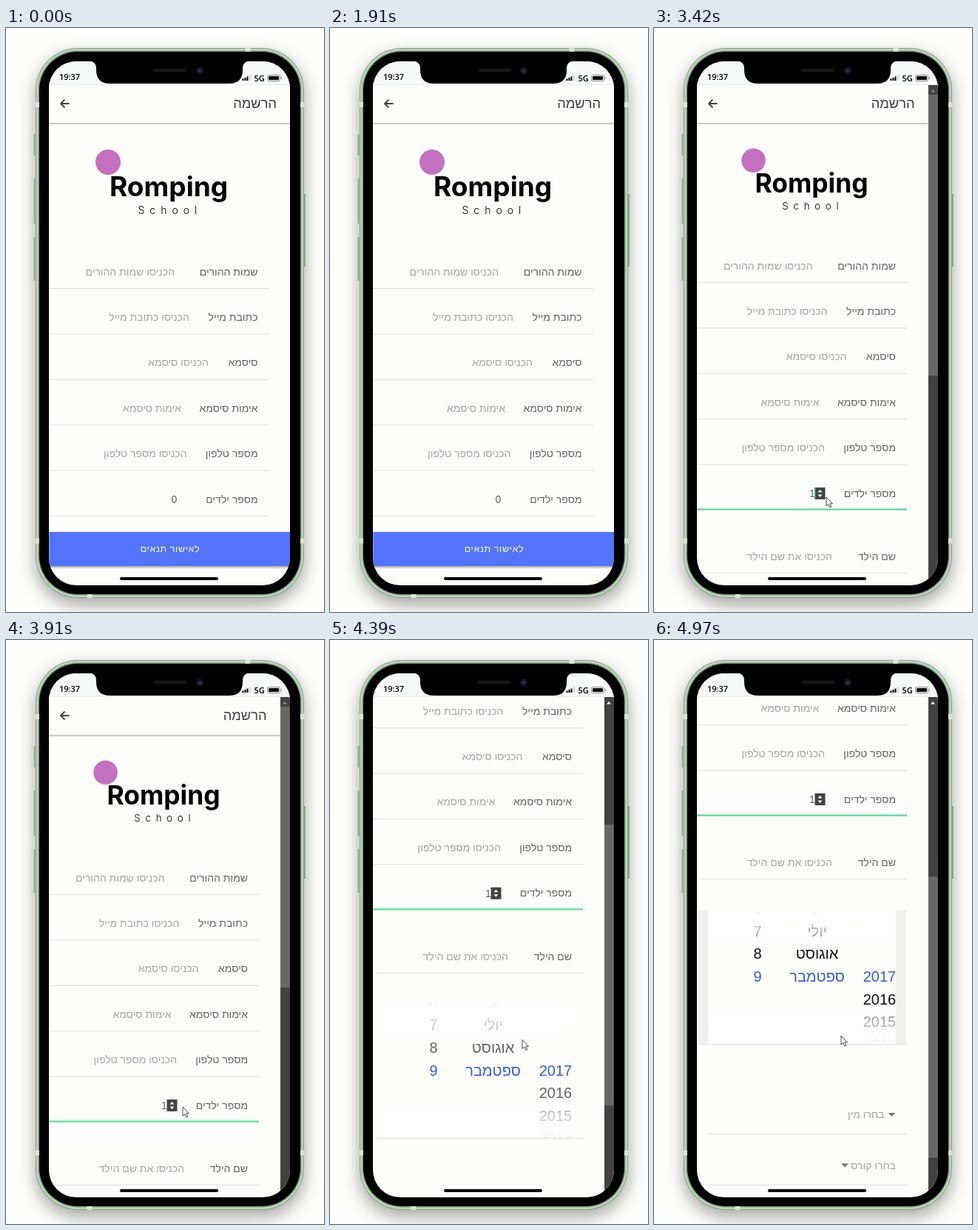
These frames come from a looping animation (430x788 px, 5000 ms). An HTML page:

```html
<!DOCTYPE html>
<html lang="he">
<head>
<meta charset="utf-8">
<title>Registration form</title>
<style>
  html, body { margin: 0; width: 100%; height: 100%; overflow: hidden; background: #fefefd; }
  svg { display: block; width: 430px; height: 788px; }
  text { font: 14px "Liberation Sans", Arial, sans-serif; }
  .rtl { direction: rtl; }
  .label { fill: #626262; }
  .hint { fill: #a3a3a3; }
  .title { font-size: 18.3px; fill: #3c3c3c; }
  .button { font-size: 12.5px; letter-spacing: .05em; fill: #fff; text-anchor: middle; }
  .status { font: 600 11px "Open Sans", sans-serif; }
  .brand { font: 700 37px Inter, sans-serif; }
  .tagline { font: 300 14px Inter, sans-serif; letter-spacing: 7px; }
  .wheel text { font-size: 20px; text-anchor: middle; }
  .picked { fill: #2f5fd8; }
</style>
</head>
<body>
<svg viewBox="0 0 430 788">
  <defs>
    <filter id="soft" x="-20%" y="-20%" width="140%" height="140%"><feGaussianBlur stdDeviation="12"/></filter>
    <filter id="thin" x="-5%" y="-20%" width="110%" height="150%"><feGaussianBlur stdDeviation="1.5"/></filter>
    <clipPath id="screen"><rect x="58" y="45" width="326" height="707" rx="37"/></clipPath>
    <clipPath id="viewport"><rect x="58" y="77" width="326" height="675"/></clipPath>
    <clipPath id="wheelBox"><rect x="58" y="777" width="284" height="181"/></clipPath>
    <linearGradient id="fadeTop" x2="0" y2="1">
      <stop stop-color="#fff"/><stop offset="1" stop-color="#fff" stop-opacity=".45"/>
    </linearGradient>
    <linearGradient id="fadeBottom" x2="0" y2="1">
      <stop stop-color="#fff" stop-opacity=".45"/><stop offset="1" stop-color="#fff"/>
    </linearGradient>
  </defs>

  <!-- phone body -->
  <rect x="40" y="36" width="363" height="742" rx="57" opacity=".36" filter="url(#soft)"/>
  <path d="M38.500 143V172M38.500 203V264M38.500 282V341M404 224V322" stroke="#8fa78e" stroke-width="2"/>
  <rect x="40" y="27" width="363" height="742" rx="57" fill="#86a386"/>
  <rect x="41" y="28" width="361" height="740" rx="56" fill="#bcd6b9"/>
  <rect x="43.500" y="30.500" width="356" height="735" rx="53.500" fill="#7d997d"/>
  <path d="M40 103.500H45M40 692H45M398 103.500H403M398 692H403M327 27V32M113 764V769" stroke="#d5e6d2" stroke-width="7"/>
  <rect x="45" y="32" width="353" height="732" rx="52"/>

  <g clip-path="url(#screen)">
    <rect x="58" y="45" width="326" height="707" fill="#fefefd"/>
    <g clip-path="url(#viewport)">
      <g id="page"></g>
      <g id="scrollbar">
        <rect x="371" y="77" width="13" height="675" fill="#424242"/>
        <rect id="thumb" x="371" y="90" width="12.500" height="379" fill="#686868"/>
        <path id="scrollUp" d="M374 86.500H380L377 83Z"/>
      </g>
      <g id="submit">
        <rect x="59" y="682" width="326" height="46" opacity=".35" filter="url(#thin)"/>
        <rect x="58.500" y="680" width="326" height="46" fill="#5474fb"/>
        <text class="rtl button" x="222" y="707">לאישור תנאים</text>
      </g>
    </g>
    <rect x="58" y="45" width="326" height="32" fill="#f7f8f8"/>
    <path d="M58 76.500H384" stroke="#e9eaea"/>
    <rect x="154" y="741" width="133" height="4" rx="2"/>
  </g>

  <!-- notch and status bar -->
  <path d="M111 44Q122 45 122 54V57Q122 75 141 75H301Q320 75 320 57V54Q320 45 331 44Z"/>
  <rect x="200" y="54.500" width="44" height="5" rx="2.500" fill="#161616"/>
  <circle cx="262" cy="57.500" r="5" fill="#141722"/>
  <circle cx="262" cy="57.500" r="2" fill="#2a3566"/>
  <text class="status" x="72" y="70">19:37</text>
  <path d="M320.500 71V68.500M323.500 71V67M326.500 71V65.500" stroke="#000" stroke-width="2"/>
  <path d="M330 71V63.500" stroke="#c4c4c4" stroke-width="1.500"/>
  <text class="status" x="335.500" y="71.500">5G</text>
  <rect x="353.500" y="63.500" width="17" height="8" rx="2" fill="none" stroke="#888"/>
  <rect x="355" y="65" width="14" height="5" rx="1"/>
  <path d="M372.300 66V69" stroke="#888"/>

  <path id="cursor" d="M0 0V12L2.800 9.500 4.800 14 6.800 13 4.900 8.800H8.500Z" fill="#fff" stroke="#333" stroke-width=".9"/>
</svg>

<script>
const LOOP = 5000;
const $ = id => document.getElementById(id);
const clamp = v => Math.min(1, Math.max(0, v));
const smooth = u => u * u * (3 - 2 * u);
const progress = (t, from, to) => clamp((t - from) / (to - from));

const rtl = (kind, x, y, s) => `<text class="rtl ${kind}" x="${x}" y="${y}">${s}</text>`;
const rule = (x1, x2, y) => `<path d="M${x1} ${y}H${x2}" stroke="#dedede"/>`;
const caretDown = (x, y) => `<path d="M${x} ${y}h10l-5 5z" fill="#777"/>`;

// label, hint, right edge of the hint
const fields = [
  ['שמות ההורים', 'הכניסו שמות ההורים', 228],
  ['כתובת מייל', 'הכניסו כתובת מייל', 248],
  ['סיסמא', 'הכניסו סיסמא', 274],
  ['אימות סיסמא', 'אימות סיסמא', 237],
  ['מספר טלפון', 'הכניסו מספר טלפון', 244.5],
  ['מספר ילדים', '', 0]
].map(([label, hint, right], i) => {
  const y = 333.5 + 61.4 * i;
  return rtl('label', 340.5, y, label) + rtl('hint', right, y, hint) + rule(58, 356, y + 18);
}).join('');

function wheelColumn(x, firstRow, values) {
  return values.map((value, i) => {
    const row = firstRow + i;
    const kind = row === 0 ? 'picked' : 'other';
    return `<text class="rtl ${kind}" x="${x}" y="${874 + 30.7 * row}">${value}</text>`;
  }).join('');
}

$('page').innerHTML = `
  <rect x="58" y="79" width="326" height="50" opacity=".4" filter="url(#thin)"/>
  <rect x="58" y="60" width="326" height="68" fill="#fefefd"/>
  <path d="M85.500 102H74.500M79.500 96.500L74 102L79.500 107.500" fill="none" stroke="#444" stroke-width="1.800"/>
  <g id="title">${rtl('title', 366, 108, 'הרשמה')}</g>
  <g id="logo">
    <circle cx="138" cy="181" r="17" fill="#c56fc1"/>
    <text class="brand" x="140" y="226.500">Romping</text>
    <text class="tagline" x="178.500" y="250.500">School</text>
  </g>
  <g id="form">
    ${fields}
    <text id="count" class="label" x="223.500" y="641"></text>
    <g id="stepper">
      <rect x="231" y="628" width="14" height="16" fill="#444"/>
      <path d="M235 634.500h6l-3-3.500zM235 637.500h6l-3 3.500z" fill="#fff"/>
    </g>
    <path id="caret" d="M231 628V644" stroke="#45d88d" stroke-width="1.500"/>
    <path id="focusLine" d="M58 657.500H355.500" stroke="#4ee39a" stroke-width="2"/>
  </g>
  <g id="child">
    ${rtl('label', 327, 718, 'שם הילד')}${rtl('hint', 241, 718, 'הכניסו את שם הילד')}
    ${rule(62, 342, 735.5)}
    <g class="wheel" clip-path="url(#wheelBox)">
      <path id="wheelSides" d="M60 777h13v181h-13zM327 777h14v181h-14z" fill="#f0f0f0"/>
      ${wheelColumn(140, -3, [6, 7, 8, 9])}
      ${wheelColumn(220.5, -3, ['יוני', 'יולי', 'אוגוסט', 'ספטמבר'])}
      ${wheelColumn(305, 0, [2017, 2016, 2015, 2014])}
      <rect x="73" y="777" width="254" height="45" fill="url(#fadeTop)"/>
      <rect x="73" y="913" width="254" height="45" fill="url(#fadeBottom)"/>
    </g>
    ${rule(64, 342, 958.5)}
    ${rtl('hint', 311.5, 1058, 'בחרו מין')}${caretDown(316.5, 1051)}${rule(72, 342, 1079.5)}
    ${rtl('hint', 327, 1127, 'בחרו קורס')}${caretDown(253, 1119.5)}${rule(72, 342, 1148.5)}
  </g>`;

// time, x, y
const cursorPath = [
  [2760, 200, 694], [2850, 233, 633], [3420, 233, 633], [3660, 239, 630],
  [4270, 239, 630], [4330, 260, 539.5], [4850, 260, 539.5], [4970, 253, 534]
];

function cursorAt(t) {
  const next = cursorPath.findIndex(key => key[0] > t);
  if (next < 0) return cursorPath.at(-1).slice(1);
  const [t0, x0, y0] = cursorPath[Math.max(0, next - 1)];
  const [t1, x1, y1] = cursorPath[next];
  const u = smooth(progress(t, t0, t1));
  return [x0 + (x1 - x0) * u, y0 + (y1 - y0) * u];
}

const show = (id, on) => $(id).style.display = on ? '' : 'none';
const place = (id, transform) => $(id).setAttribute('transform', transform);
const others = document.querySelectorAll('.other');

function draw(t) {
  const clicked = t >= 3400;
  const scroll = 411.5 * smooth(progress(t, 4289, 4450)) + (t >= 4580 ? 1.5 : 0);
  const settle = progress(t, 4570, 4780);

  // the scrollbar narrows the page, which shrinks the logo and shifts the form
  place('title', clicked ? 'translate(-13.5)' : '');
  place('logo', clicked ? 'translate(58 128) scale(.957) translate(-58 -128)' : '');
  place('form', clicked ? 'translate(-13.5 -8)' : '');
  place('page', `translate(0 ${-scroll})`);
  place('thumb', `translate(0 ${scroll * 0.556})`);
  $('scrollUp').setAttribute('fill', scroll > 0 ? '#fff' : '#888');
  $('count').textContent = clicked ? 1 : 0;

  show('submit', !clicked);
  for (const id of ['scrollbar', 'child', 'focusLine']) show(id, clicked);
  show('stepper', t >= 2850);
  show('caret', t >= 3410 && Math.floor((t - 3410) / 500) % 2 === 0);

  $('wheelSides').setAttribute('opacity', settle);
  const grey = Math.round(100 - 84 * settle);
  others.forEach(el => el.setAttribute('fill', `rgb(${grey},${grey},${grey})`));

  show('cursor', t >= 2760);
  place('cursor', `translate(${cursorAt(t)})`);
}

const start = performance.now();
function tick() {
  draw((performance.now() - start) % LOOP);
  requestAnimationFrame(tick);
}
tick();
</script>
</body>
</html>
```
